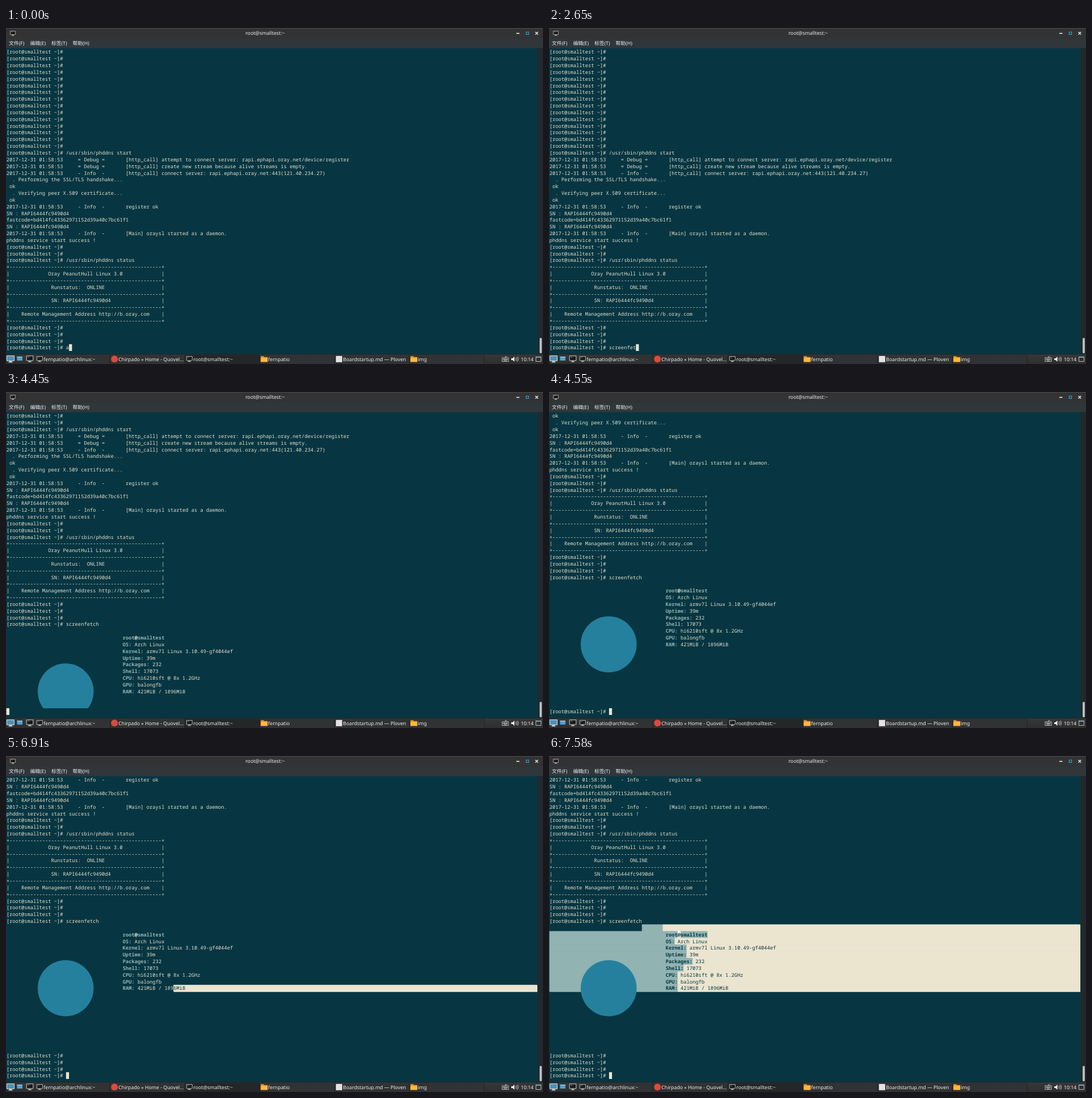
Write an HTML page that moves like this. It is 947 by 592 pixels and loops after 8 s.

```html
<!DOCTYPE html>
<html lang="zh">
<head>
<meta charset="utf-8">
<title>Terminal</title>
<style>
  html, body { margin: 0; width: 100%; height: 100%; overflow: hidden; background: #073642; }
  svg { position: absolute; left: 0; top: 0; }
  svg text {
    font: 8.768px "Noto Sans", "Noto Sans CJK SC", "Noto Sans CJK", sans-serif;
    fill: #f0f0ee; text-rendering: geometricPrecision; white-space: pre;
  }
  #term {
    position: absolute; left: 0; top: 0; width: 1440px; height: 900px; overflow: hidden;
    transform: scale(.65764, .65778); transform-origin: 0 0;
    font: 13.3333px/18px "Noto Sans Mono", monospace;
    font-variant-ligatures: none; text-rendering: geometricPrecision;
    white-space: pre; color: #e4dfcc;
  }
  #rows { position: absolute; left: 1px; top: 55px; }
  #rows div { height: 18px; }
  #rows span { display: inline-block; height: 18px; vertical-align: top; }
  .label, .at { font-weight: bold; }
  .label { color: #91b3b2; }
  .at { color: #fdf6e3; }
  /* The shadow closes the hairline gaps between scaled cells. */
  #rows .sel { --back: #ebe5d0; background: var(--back); box-shadow: 1px 1px var(--back); color: #073642; }
  #rows .sel.label { --back: #91b3b2; }
  #rows .sel.at { --back: #fdf6e3; }
  #cursor { position: absolute; width: 8px; height: 18px; background: #ebe5d0; }
  #badge { position: absolute; left: 0; width: 310px; overflow: hidden; }
  #badge i { position: absolute; left: 85px; top: 96px; width: 150px; height: 150px; border-radius: 50%; background: #25809d; }
</style>
</head>
<body>
<div id="term"><div id="rows"></div><div id="badge"><i></i></div><div id="cursor"></div></div>

<svg width="947" height="592" viewBox="0 0 947 592">
  <defs>
    <linearGradient id="bar" x2="0" y2="1">
      <stop offset="0" stop-color="#383838"/><stop offset="1" stop-color="#2d2e2e"/>
    </linearGradient>
    <g id="screen">
      <rect x="-5.5" y="-5" width="11" height="8" rx="1" fill="#c9cbc8"/>
      <rect x="-4.6" y="-4.1" width="9.2" height="6.2" fill="#17191a"/>
      <path d="M-3.5-2.5h3" stroke="#999" stroke-width=".7"/>
      <path d="M-1.5 3h3l1.5 2h-6z" fill="#b4b6b3"/>
    </g>
    <g id="folder">
      <path d="M-6-5h5l1 1.5h6v8.5h-12z" fill="#e59a20"/>
      <path d="M-6-2h12v7h-12z" fill="#fbb846"/>
    </g>
  </defs>

  <rect width="947" height="18.5" fill="#333"/>
  <rect width="947" height=".7" fill="#555"/>
  <rect y="18.2" width="947" height="17.4" fill="#30363a"/>
  <use href="#screen" transform="translate(12 9.3) scale(.85)"/>
  <text x="457" y="12.4" text-anchor="middle">root@smalltest:~</text>
  <g fill="none" stroke="#fff" stroke-width="1.4">
    <path d="M900 9.5h5.4M933.6 7l4.6 4.6m0-4.6l-4.6 4.6"/>
    <rect x="917.4" y="7.2" width="4.2" height="4.2" stroke="#2f9fd0" stroke-width="1.2"/>
  </g>
  <text x="5" y="30">文件(F)</text>
  <text x="42.5" y="30">编辑(E)</text>
  <text x="80" y="30">标签(T)</text>
  <text x="117.6" y="30">帮助(H)</text>

  <rect x="937.5" y="35.6" width="9.5" height="539" fill="#22292c"/>
  <rect x="941" y="546" width="4" height="27" rx="1.5" fill="#b9bcbb"/>

  <rect y="574.5" width="947" height="17.5" fill="url(#bar)"/>
  <rect y="574.5" width="947" height=".6" fill="#17191a"/>
  <rect x="1" y="577" width="14" height="10" rx="1" fill="#d5dadd"/>
  <rect x="2" y="578" width="12" height="8" fill="#4b93bd"/>
  <path d="M4 589.5h8l-2-2.5h-4z" fill="#c0c4c5"/>
  <rect x="19.5" y="579" width="9.5" height="7" fill="#4aa3d6"/>
  <rect x="19.5" y="579" width="9.5" height="1.2" fill="#a9d3ea"/>
  <use href="#screen" transform="translate(42 583) scale(1.15)"/>
  <g id="tasks"></g>

  <g fill="none" stroke="#d6d8d7" stroke-width=".8">
    <rect x="875" y="581" width="11" height="6.5"/>
    <path d="M876.5 583h8M876.5 584.5h8M878 586h5M880.5 581v-2h3"/>
    <path d="M898.5 581.2q1.8 2.3 0 4.6M900.3 580q2.8 3.5 0 7M902 579q3.4 4.5 0 9"/>
    <rect x="934.5" y="579.5" width="9" height="8"/>
    <path d="M934.5 580.5h9" stroke="#4a9fc8"/>
  </g>
  <path d="M891 582h2.4l3.2-3v9l-3.2-3h-2.4z" fill="#f0f0ee"/>
  <text x="908" y="586.6">10:14</text>
</svg>

<script>
const $ = id => document.getElementById(id);
const LOOP = 8000, ROWS = 45, COLS = 178, LINE = 18, CELL = 8;

const screenIcon = '<use href="#screen"/>', folderIcon = '<use href="#folder"/>';
const tasks = [
  [screenIcon, 'fernpatio@archlinux:~'],
  ['<circle r="6" fill="#dc4a3c"/>', 'Chirpado » Home - Quovel...'],
  [screenIcon, 'root@smalltest:~'],
  [folderIcon, 'fernpatio'],
  ['<rect x="-5.5" y="-5.5" width="11" height="11" fill="#e6e2e4"/>', 'Boardstartup.md — Ploven'],
  [folderIcon, 'img'],
];
$('tasks').innerHTML = tasks.map(([icon, name], i) => {
  const x = 52 + i * 132;
  return `<rect x="${x}" y="575.5" width="131" height="16.5" fill="${i === 2 ? '#242627' : '#303233'}"/>
    <path d="M${x + 131.3} 575.5v16.5" stroke="#1c1d1e" stroke-width=".7"/>
    <g transform="translate(${x + 7.3} 583.3)">${icon}</g><text x="${x + 14.3}" y="586.6">${name}</text>`;
}).join('');

// A line is a list of [text, class] segments.
const plain = text => [[text, '']];
const prompt = (text = '') => plain('[root@smalltest ~]# ' + text);
const log = (tag, text) => `2017-12-31 01:58:53     ${tag}       ${text}`;
const rule = '+' + '-'.repeat(51) + '+';
const boxed = (indent, text) => '|' + (' '.repeat(indent) + text).padEnd(51) + '|';
const prompts = n => Array.from({ length: n }, () => prompt());

const history = [
  ...prompts(15),
  prompt('/usr/sbin/phddns start'),
  ...[
    log('= Debug =', '[http_call] attempt to connect server: rapi.ephapi.oray.net/device/register'),
    log('= Debug =', '[http_call] create new stream because alive streams is empty.'),
    log('- Info  -', '[http_call] connect server: rapi.ephapi.oray.net:443(121.40.234.27)'),
    '  . Performing the SSL/TLS handshake...',
    ' ok',
    '  . Verifying peer X.509 certificate...',
    ' ok',
    log('- Info  -', 'register ok'),
    'SN : RAPI6444fc9490d4',
    'fastcode=bd414fc43362971152d39a40c7bc61f1',
    'SN : RAPI6444fc9490d4',
    log('- Info  -', '[Main] oraysl started as a daemon.'),
    'phddns service start success !',
  ].map(plain),
  ...prompts(2),
  prompt('/usr/sbin/phddns status'),
  ...[
    rule, boxed(13, 'Oray PeanutHull Linux 3.0'),
    rule, boxed(14, 'Runstatus:  ONLINE'),
    rule, boxed(14, 'SN: RAPI6444fc9490d4'),
    rule, boxed(4, 'Remote Management Address http://b.oray.com'),
    rule,
  ].map(plain),
  ...prompts(3),
];

const margin = ' '.repeat(39);
const info = (label, value) => [[margin + label + ':', 'label'], [' ' + value, '']];
const output = [
  [[' '.repeat(38), 'label']],
  [[margin + 'root', 'label'], ['@', 'at'], ['smalltest', 'label']],
  info('OS', 'Arch Linux'),
  info('Kernel', 'armv7l Linux 3.10.49-gf4044ef'),
  info('Uptime', '39m'),
  info('Packages', '232'),
  info('Shell', '17073'),
  info('CPU', 'hi6210sft @ 8x 1.2GHz'),
  info('GPU', 'balongfb'),
  info('RAM', '421MiB / 1896MiB'),
  ...Array.from({ length: 9 }, () => plain('')),
];

// [time, typed text, printed output lines (-1: not yet run), new prompts]
const command = 'screenfetch ';
const steps = [
  [0, 'a', -1, 0],
  ...[[40, 0], [220, 1], [420, 2], [620, 3], [1210, 5], [1370, 6], [2430, 7], [2470, 8], [2650, 9], [2910, 12]]
    .map(([time, n]) => [time, command.slice(0, n), -1, 0]),
  ...[[3690, 0, 0], [4350, 4, 0], [4400, 8, 0], [4450, 12, 0], [4500, 16, 0], [4550, 19, 1], [5510, 19, 2], [5640, 19, 4]]
    .map(([time, n, p]) => [time, command, n, p]),
];

// The drag moves up from the last info line; everything after its point is selected.
const mix = (a, b, p) => Math.round(a + (b - a) * p);
function selection(t) {
  if (t < 6910) return null;
  const k = Math.min(14, Math.floor((t - 6909) / 47.857));
  return k < 4
    ? { row: 31 - k, col: mix(56, 42, k / 4) }
    : { row: mix(27, 22, (k - 4) / 10), col: mix(42, 31, (k - 4) / 10) };
}

function span(text, cls) {
  const el = document.createElement('span');
  el.textContent = text;
  el.className = cls;
  return el;
}

function rowElement(line, from) {
  const row = document.createElement('div');
  const length = line.reduce((sum, [text]) => sum + text.length, 0);
  const segments = from < COLS ? [...line, [' '.repeat(COLS - length), '']] : line;
  let col = 0;
  for (const [text, cls] of segments) {
    const cut = Math.max(0, Math.min(text.length, from - col));
    if (cut) row.append(span(text.slice(0, cut), cls));
    if (cut < text.length) row.append(span(text.slice(cut), cls + ' sel'));
    col += text.length;
  }
  return row;
}

let shown = '';
function render(t) {
  const [, typed, printed, fresh] = steps.findLast(step => step[0] <= t);
  const sel = selection(t);
  const key = JSON.stringify([typed, printed, fresh, sel]);
  if (key === shown) return;
  shown = key;

  const lines = [...history, prompt(typed)];
  if (printed >= 0) lines.push(...output.slice(0, printed), ...(fresh ? prompts(fresh) : [plain('')]));
  const scroll = lines.length - ROWS;

  $('rows').replaceChildren(...lines.slice(scroll).map((line, y) => {
    const inside = sel && y >= sel.row && y <= 31;
    return rowElement(line, inside ? (y === sel.row ? sel.col : 0) : COLS);
  }));
  $('cursor').style.left = 1 + lines.at(-1)[0][0].length * CELL + 'px';
  $('cursor').style.top = 55 + (ROWS - 1) * LINE + 'px';
  $('badge').style.top = 55 + (history.length + 1 - scroll) * LINE + 'px';
  $('badge').style.height = Math.max(0, printed) * LINE + 'px';
}

const start = performance.now();
function tick() {
  render((performance.now() - start) % LOOP);
  requestAnimationFrame(tick);
}
tick();
</script>
</body>
</html>
```
